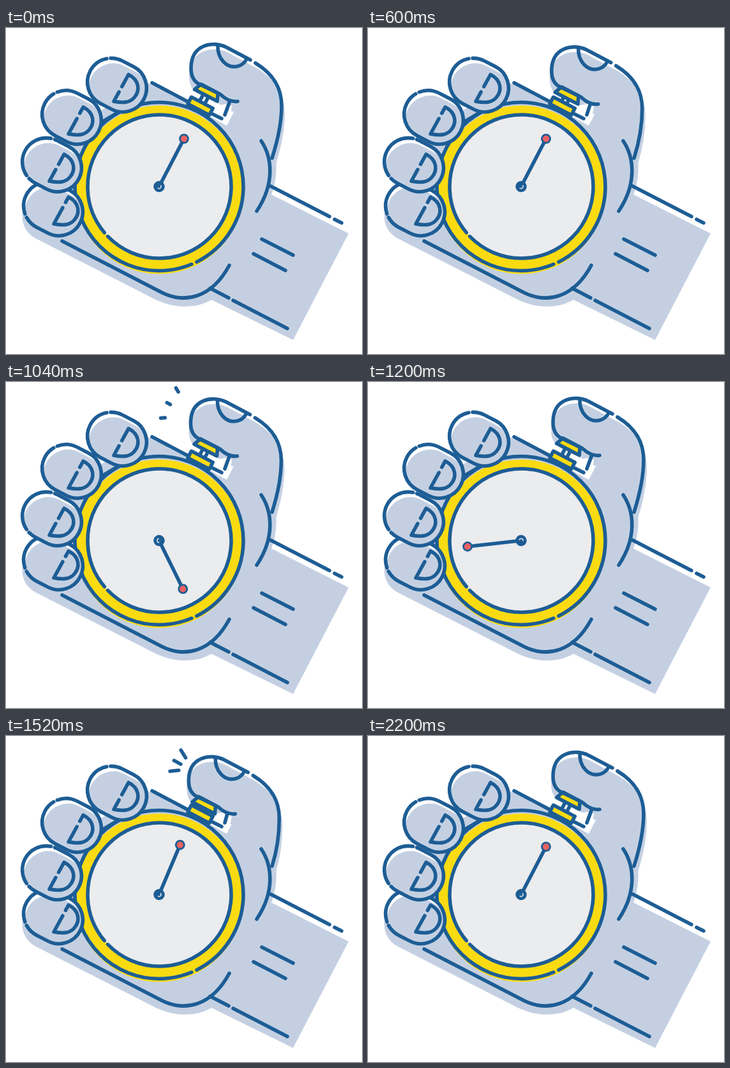
An HTML page for the animation above (2.24 s loop, 558x511 px).

```html
<!DOCTYPE html>
<html lang="en">
<head>
<meta charset="utf-8">
<title>Stopwatch in hand</title>
<style>
  html, body { margin: 0; width: 100%; height: 100%; overflow: hidden; background: #fff; }
  svg { display: block; width: 558px; height: 511px; }
  .line { fill: none; stroke: #1d5d95; stroke-width: 5.6; stroke-linecap: round; stroke-linejoin: round; }
  .skin { fill: #c4d0e2; }
  .gold { fill: #fadb12; }
  .white { fill: #fff; }
  .ink { fill: #1d5d95; }
</style>
</head>
<body>
<svg viewBox="0 0 558 511">
  <path class="skin" d="M130 140L222 86L290 121L340 150L400 180L423 203Q426 235 416 261L537 322L450 489L322 426C302 438 270 442 235 426L45 329Q20 314 27 280Z"/>
  <path id="thumbSkin" class="skin" stroke="#c4d0e2" stroke-width="8" transform="translate(1 12)"/>
  <path class="white" d="M328 122L345 119L354 122L352 136L345 142L328 134Z"/>
  <path id="fold" class="line"/>
  <g id="sparks" class="line"></g>

  <circle class="skin" cx="240" cy="248.500" r="132"/>
  <circle class="gold" cx="240" cy="253.500" r="132"/>
  <g transform="translate(239.500 247.500) rotate(27.500)">
    <path class="line" d="M-4.500-158V-148M4.500-158V-148"/>
    <path class="line" style="fill:#fadb12" d="M-19-147H19V-135H-19Z"/>
    <path id="cap" class="line" style="fill:#fadb12" d="M-20-160H20L15-172H-15Z"/>
  </g>
  <circle class="line" cx="240" cy="248.500" r="132" pathLength="360" stroke-dasharray="356.200 3.800" stroke-dashoffset="-67.300"/>
  <circle cx="240.500" cy="248.500" r="112.500" fill="#ebecee"/>
  <circle class="line" cx="240.500" cy="248.500" r="112.500" pathLength="360" stroke-dasharray="356 4" stroke-dashoffset="-140"/>

  <g id="needle">
    <path class="line" d="M0 0V-78"/>
    <circle class="ink" r="8.700"/>
    <path d="M-3 0A3 3 0 0 0 3 0" transform="rotate(-70)" fill="none" stroke="#dfe5ed" stroke-width="1.500"/>
    <circle cy="-84.500" r="6.500" fill="#ea6262" stroke="#1d5d95" stroke-width="2.800"/>
  </g>

  <path class="line" d="M229 86L284 115M151 147L173 134"/>
  <g id="fingers"></g>
  <path class="line" d="M88 334L245 415C280 432 322 424 350 372M320 408L349 423M356 427L441 471M415 248L507 295.500M515 300L526 305.500M401 331L450 356M388 354L438 380M400 177C418 204 421 245 393 287"/>
  <path id="nail" class="line"/>
  <path id="thumb" class="line"/>
</svg>
<script>
const $ = id => document.getElementById(id);
const clamp = x => Math.max(0, Math.min(1, x));
const smooth = x => { x = clamp(x); return x * x * (3 - 2 * x); };

// Centre, dash pattern and its start, nail corner, position of the break in the nail
const fingers = [
  [74, 283.5, '352 8', 140, 98, 265, .3],
  [72, 214.5, '116 8 228 8', 127, 91, 198, .47],
  [103, 140, '352 8', 215, 121, 124, .33],
  [174, 89.5, '352 8', 232, 192, 73, .55]
];
$('fingers').innerHTML = fingers.map(([x, y, dash, start, nx, ny, gap], i) => {
  // Pill that starts at its right end and runs clockwise
  const shape = 'd="M47.5 0A37.5 37.5 0 0 1 10 37.5H-10A37.5 37.5 0 0 1 -10 -37.5H10A37.5 37.5 0 0 1 47.5 0Z" transform="rotate(27.5)"';
  const at = f => `${-23 * f} ${42 * f}`;
  return `<g transform="translate(${x} ${y})">
    <clipPath id="clip${i}"><path ${shape}/></clipPath>
    <path class="white" ${shape}/>
    <g clip-path="url(#clip${i})"><g transform="translate(3 9)"><path class="skin" ${shape} stroke="#c4d0e2" stroke-width="2"/></g></g>
    <path class="line" ${shape} pathLength="360" stroke-dasharray="${dash}" stroke-dashoffset="${-start}"/>
    </g>
    <path class="line" transform="translate(${nx} ${ny})"
      d="M${at(gap - .1)}L0 0C18 9 18 26 9 36C2 44 -8 45 -23 42L${at(gap + .1)}"/>`;
}).join('');

// Inner end, then full travel of each spark
const rays = [[282.7, 36, -16.3, -26.5], [275.5, 45, -23.2, -12.6], [273, 53.6, -30.5, 3]];
$('sparks').innerHTML = rays.map(() => '<path/>').join('');

// Easing curve with control points (a, 0) and (b, 1)
function ease(x, a, b) {
  x = clamp(x);
  let lo = 0, hi = 1;
  for (let i = 0; i < 24; i++) {
    const u = (lo + hi) / 2, v = 1 - u;
    if (3 * u * v * v * a + 3 * u * u * v * b + u * u * u < x) lo = u; else hi = u;
  }
  return smooth(lo);
}

function drawThumb(press) {
  const q = (x, y) => `${x - 3.7 * press} ${y + 7 * press} `;
  const tip = `${q(345, 30)}C${q(325, 20)}${q(290, 25)}${q(290, 63)}C${q(290, 76)}${q(295, 84)}${q(303, 88)}L${q(336, 104)}Q${q(350, 117)}${q(363, 115)}`;
  const back = `C424 182 ${q(432, 152)}${q(432, 122)}C${q(432, 99)}${q(424, 75)}${q(391, 55)}`;
  $('thumbSkin').setAttribute('d', `M417 204${back}L${tip}L345 150L400 230Z`);
  $('thumb').setAttribute('d', `M417 204${back}M${q(383, 50)}L${tip}`);
  $('nail').setAttribute('d', `M${q(332, 27)}C${q(331, 48)}${q(346, 64)}${q(363, 60)}Q${q(372, 58)}${q(377, 49)}`);
  $('fold').setAttribute('d', `M${q(350, 117)}L343 136M324 135L338 142`);
  $('cap').setAttribute('transform', `translate(0 ${8 * press})`);
}

function drawSparks(t) {
  const head = clamp((t - 680) / 360) ** .8;
  const tail = clamp((t - 760) / 320) ** 1.9;
  const shown = head > tail + .01;
  rays.forEach(([x, y, dx, dy], i) => {
    const at = f => `${x + dx * f} ${y + dy * f}`;
    $('sparks').children[i].setAttribute('d', shown ? `M${at(tail)}L${at(head)}` : '');
  });
}

function frame(now) {
  const t = Math.floor(now % 2240 / 40) * 40;
  const beat = t < 1200 ? t : t - 680;
  drawThumb(smooth((beat - 520) / 140) - smooth((beat - 920) / 160));
  drawSparks(beat);
  const turn = 27.5 + 360 * ease((t - 760) / 840, .285, .51);
  $('needle').setAttribute('transform', `translate(240 248.5) rotate(${turn})`);
  requestAnimationFrame(frame);
}
frame(0);
</script>
</body>
</html>
```
